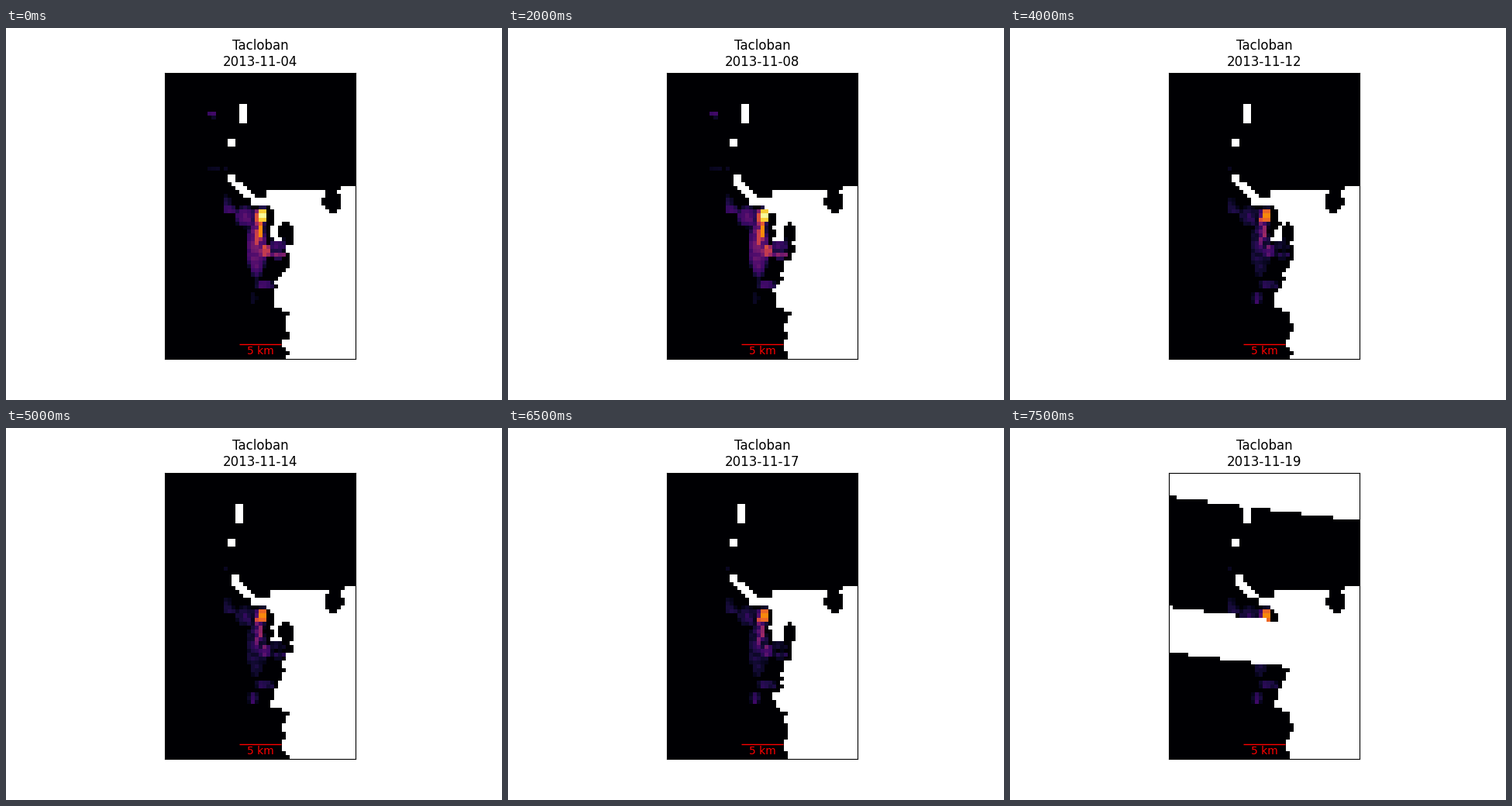
Recreate the animation shown at these times as a matplotlib script. Size 640 px wide and 480 px high, loop 8 s.

```python
import numpy as np
import matplotlib.pyplot as plt
from matplotlib.animation import FuncAnimation
from mpl_toolkits.axes_grid1.anchored_artists import AnchoredSizeBar

ROWS, COLS = 73, 49
FIRST, DAYS = 4, 16
STORM, REPAIR, CLOUDY = 9, 11, 19
ASPECT = 1.007  # cells are slightly taller than wide
row, col = np.mgrid[:ROWS, :COLS]

# Light sources: row, col, two radii, then level before, during, after the storm
SOURCES = [
    (36, 24.5, 2, 1, 1, 0, .75),             # centre
    (36.5, 23, 1.8, .7, .6, 0, .42),
    (39.8, 24, 2.4, .7, .75, .36, .3),       # main street
    (41.5, 23, 2.6, .7, .55, .38, .33),
    (45, 25.3, 1.8, 1.6, .52, .2, .25),      # market
    (46, 28.5, 1, 2, .38, 0, .14),           # harbour
    (43.5, 28.5, 2, 2, .18, 0, .07),
    (44, 23, 7.5, 2.5, .29, .13, .12),       # old town
    (36.3, 20, 2.5, 2.6, .23, .08, .12),     # suburbs
    (34.5, 16, 1.2, 2, .17, 0, .09),
    (32.5, 15.1, 1.6, 1.1, .12, 0, .08),
    (53.6, 25, 1.1, 2.3, .22, .2, .17),      # southern road
    (57, 22, 1.7, 1.2, .06, 0, .16),
    (10.2, 11.6, .9, .9, .18, 0, 0),         # villages
    (24, 12, .7, 1.4, .06, 0, 0),
    (24, 15, .6, .6, .06, 0, .06),
]

# Shoreline turns: row and first water column from there down
TURNS = np.array([
    (30, 27), (32, 22), (34, 26), (35, 27), (36, 28), (39, 27), (43, 32),
    (48, 31), (51, 30), (53, 29), (55, 28), (56, 27), (60, 29), (61, 31),
    (68, 30), (71, 31)])
# Strait pieces: top row, bottom row, column at the top, slope, width
STRAIT = [(8, 12, 18, 0, 2), (17, 18, 16, 0, 2), (26, 27, 16, 0, 2),
          (28, 31, 17, 1, 3), (29, 29, 45, 0, 4)]
# Land in the bay: row, col, two radii
CAPES = [(32.4, 42.2, 3, 2.4), (40.4, 30.6, 2.7, 1.9)]


def distance2(r, c, height, width):
    return ((row - r) / height) ** 2 + ((col - c) / width) ** 2


def light_field(day):
    phase = (day >= STORM) + (day >= REPAIR)
    field = np.zeros((ROWS, COLS))
    for *shape, before, during, after in SOURCES:
        level = (before, during, after)[phase]
        field = np.maximum(field, level * np.exp(-distance2(*shape) ** 3))
    spread = .2 if phase == 0 else .45
    grain = np.random.default_rng(7).uniform(-1, 1, field.shape)
    field = np.where(field < .5, field * (1 + spread * grain), field)
    return np.where(field < .04, 0, field)


def swaths():
    """Slanted bands without data."""
    slant = col / 8
    top = row < np.floor(6.75 + slant)
    middle = (row >= np.floor(34.9 + slant)) & (row < np.floor(46.375 + slant))
    return top | middle


def water_mask(day):
    # the detected shore wavers by a cell from day to day
    rng = np.random.default_rng(day)
    waver = np.repeat(rng.choice([-1, 0, 0, 0, 1], ROWS), 2)[:ROWS]
    turn = np.searchsorted(TURNS[:, 0], np.arange(ROWS), side="right") - 1
    shore = TURNS[turn, 1] + waver
    mask = (row >= TURNS[0, 0]) & (col >= shore[:, None])
    for r, c, height, width in CAPES:
        c += rng.choice([-.5, 0, .5])
        mask &= distance2(r, c, height, width) > 1
    for top, bottom, left, slope, width in STRAIT:
        start = left + rng.choice([0, 0, 1]) + slope * (row - top)
        mask |= ((row >= top) & (row <= bottom)
                 & (col >= start) & (col < start + width))
    return mask | swaths() if day == CLOUDY else mask


def scene(day):
    return np.ma.masked_array(light_field(day), water_mask(day))


fig, ax = plt.subplots(figsize=(6.4, 4.8), dpi=100)
image = ax.imshow(scene(FIRST), cmap="inferno", vmin=0, vmax=1,
                  interpolation="nearest", aspect=ASPECT)
ax.set_xticks([])
ax.set_yticks([])
title = ax.set_title("")
ax.add_artist(AnchoredSizeBar(ax.transData, 10.75, "5 km", "lower center",
                              color="red", frameon=False))


def update(i):
    day = FIRST + i
    image.set_data(scene(day))
    title.set_text(f"Tacloban\n2013-11-{day:02d}")
    return image, title


anim = FuncAnimation(fig, update, frames=DAYS, interval=500, repeat=True)
plt.show()
```
